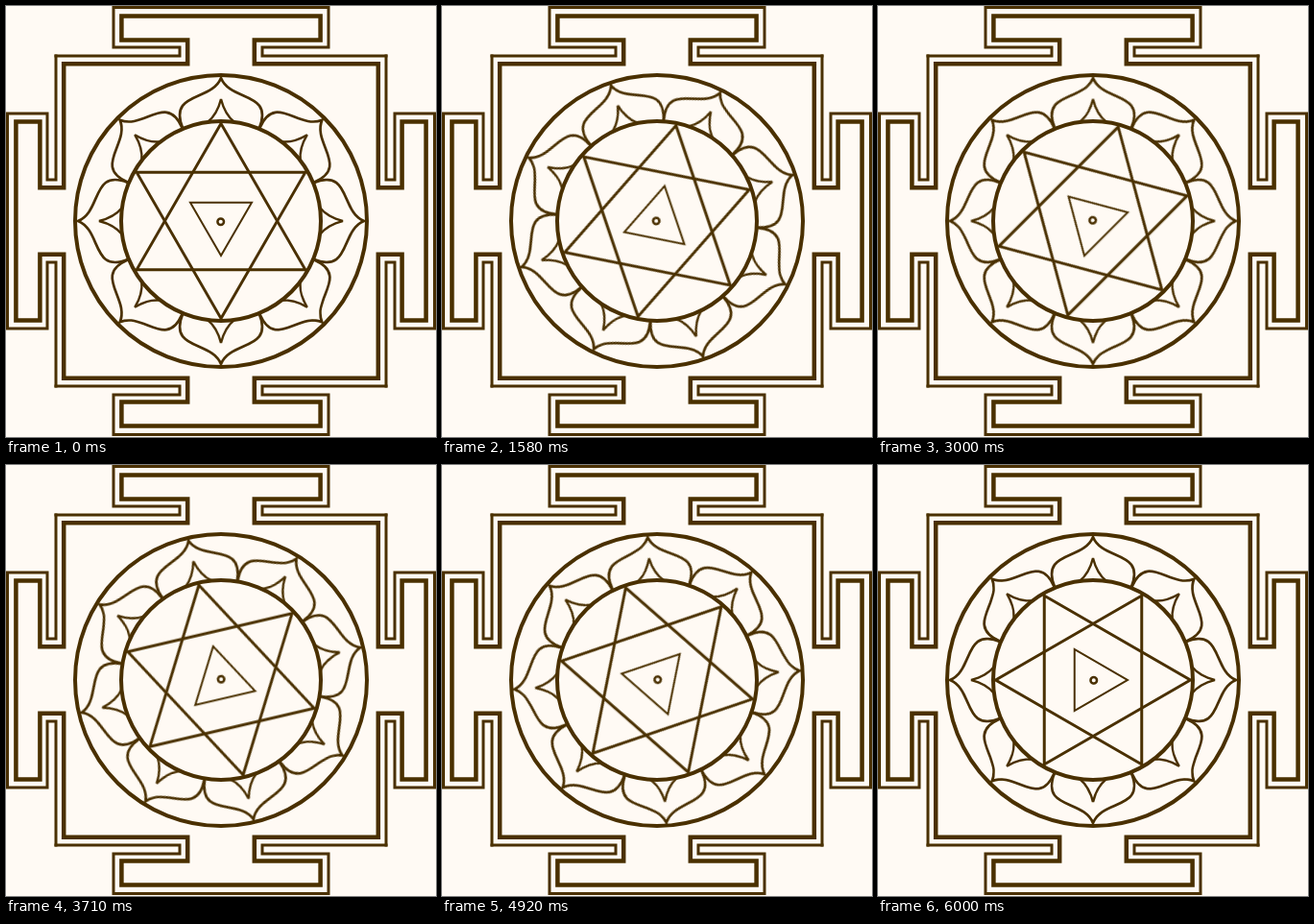
Animation, 448 px wide and 449 px high, one loop 6040 ms. Source, as an HTML page:

```html
<!DOCTYPE html>
<html lang="en">
<head>
<meta charset="utf-8">
<title>Yantra</title>
<style>
  html, body { margin: 0; width: 100%; height: 100%; overflow: hidden; background: #fffaf4; }
  svg { display: block; width: 100vw; height: 100vh; fill: none; stroke: #4a3000; }
  .wheel {
    transform-origin: 0 0;
    /* 24 poses a second; the small lead keeps each switch on its 10 ms tick */
    animation: turn 6040ms steps(145, jump-none) -4ms infinite;
  }
  @keyframes turn {
    from { transform: rotate(0deg); }
    to { transform: rotate(270deg); }
  }
</style>
</head>
<body>
<svg viewBox="-224 -224 448 449">
  <defs>
    <g id="gate" stroke-linecap="square">
      <path stroke-width="3" d="M-172-172H-43V-181H-112V-222.5H112V-181H43V-172H172"/>
      <path stroke-width="4.5" d="M-163.8-163.8H-34.8V-188.6H-103.6V-213.6H103.6V-188.6H34.8V-163.8H163.8"/>
    </g>
    <g id="petal">
      <path stroke-width="2.7" d="M-40-97C-55-135-10-124 0-149C10-124 55-135 40-97"/>
      <path stroke-width="2.4" d="M-14-103Q-4-111 0-127Q4-111 14-103"/>
    </g>
    <g id="pair">
      <use href="#petal"/>
      <use href="#petal" transform="rotate(45)"/>
    </g>
    <path id="triangle" stroke-width="2.9" d="M0-101.5L87.9 50.75H-87.9Z"/>
  </defs>

  <use href="#gate"/>
  <use href="#gate" transform="rotate(90)"/>
  <use href="#gate" transform="rotate(180)"/>
  <use href="#gate" transform="rotate(270)"/>

  <g class="wheel">
    <use href="#pair"/>
    <use href="#pair" transform="rotate(90)"/>
    <use href="#pair" transform="rotate(180)"/>
    <use href="#pair" transform="rotate(270)"/>
    <use href="#triangle"/>
    <use href="#triangle" transform="rotate(180)"/>
    <path stroke-width="2" d="M0 36L-32-19.3H32Z"/>
    <circle cx="-.3" cy=".8" r="3.3" stroke-width="2.5"/>
  </g>

  <g stroke-width="4">
    <circle r="152"/>
    <circle r="104"/>
  </g>
</svg>
</body>
</html>
```
